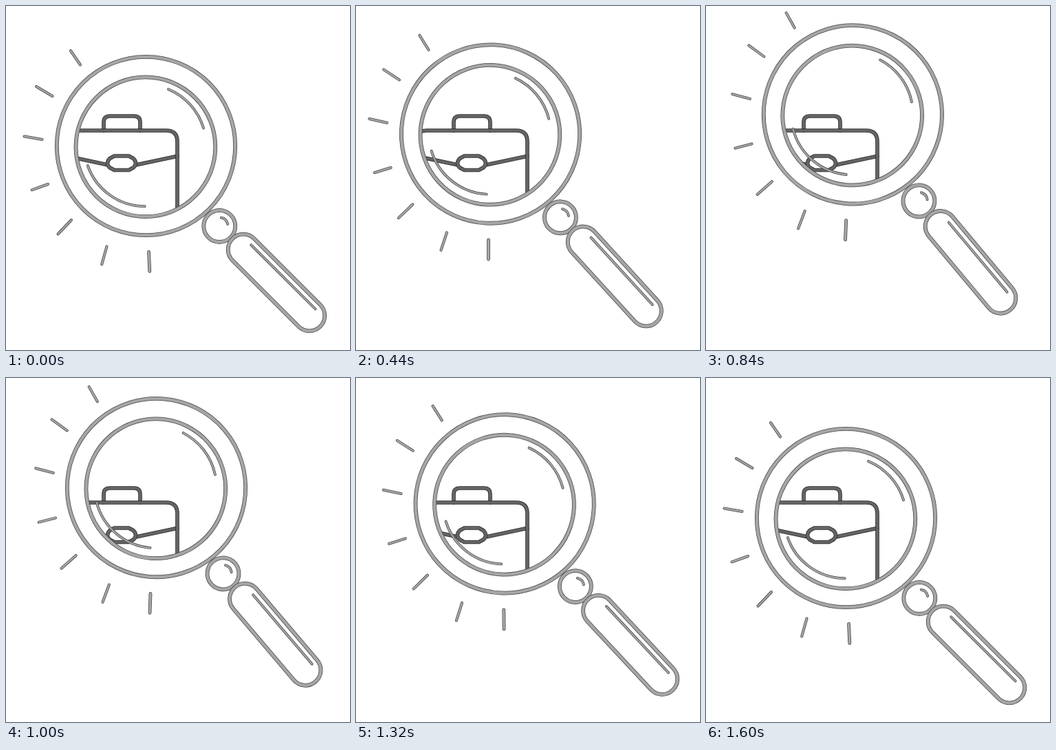
Write an HTML page that moves like this. It is 500x500 px and loops after 1640 ms.

```html
<!DOCTYPE html>
<html lang="en">
<head>
<meta charset="utf-8">
<title>Magnifier over briefcase</title>
<style>
html, body { margin: 0; width: 100%; height: 100%; overflow: hidden; background: #fff; }
svg { display: block; width: 100vw; height: 100vh; }
path { fill: none; stroke-linecap: round; stroke-linejoin: round; }
</style>
</head>
<body>
<svg viewBox="0 0 500 500">
  <clipPath id="view"><circle id="hole" r="101.5"/></clipPath>
  <g id="bag" clip-path="url(#view)"></g>
  <g id="glass"></g>
</svg>
<script>
const $ = id => document.getElementById(id);
const STEP = 40, STEPS = 41;
const HOLE = [-0.6, 1.3];

// A line drawn as a dark outline with a lighter core.
function line(parent, d, width, core, edge, rim = 1.5) {
  for (const [stroke, w] of [[edge, width], [core, width - rim]]) {
    const p = document.createElementNS("http://www.w3.org/2000/svg", "path");
    p.setAttribute("d", d);
    p.setAttribute("stroke", stroke);
    p.setAttribute("stroke-width", w);
    parent.append(p);
  }
}
const ring = (x, y, r) =>
  `M${x - r} ${y}a${r} ${r} 0 1 1 ${2 * r} 0a${r} ${r} 0 1 1 ${-2 * r} 0z`;

function drawBag() {
  const part = d => line($("bag"), d, 5.6, "#646464", "#262626");
  part("M142 181V169Q142 160 151 160H186Q195 160 195 169V181");
  part("M87 218L147 230.7M190 230.7L249 218.3");
  part("M87 330V197Q87 181 103 181H233Q249 181 249 197V330");
  part("M157.5 218H178.5L185 221.5Q188.5 225 188.5 228.5Q188.5 232 185 235L178.5 238.5H157.5L151 235Q147.5 232 147.5 228.5Q147.5 225 151 221.5Z");
}

// Coordinates are relative to the lens centre.
function drawGlass() {
  const part = (d, w = 5.8) => line($("glass"), d, w, "#a6a6a6", "#454545");
  const thin = d => part(d, 3.8);
  part(ring(0, 0, 129.7));
  part(ring(...HOLE, 101.4));
  part(ring(106.8, 116.5, 23));
  const r = 22.3, k = r * Math.SQRT1_2;
  part(`M${141.5 + k} ${150.5 - k}l96 96a${r} ${r} 0 0 1 ${-2 * k} ${2 * k}l-96 -96a${r} ${r} 0 0 1 ${2 * k} ${-2 * k}z`);
  thin("M32.5 -82.6A89 89 0 0 1 83.6 -26");
  thin("M-84.7 28.5A88.5 88.5 0 0 0 -1.8 87.7");
  thin("M109.3 104.2Q117 105.5 118.8 113.5");
  thin("M152.8 143.8L246.3 237");
  const rays = [
    [-109.5, -138.5, -95.5, -118], [-159.5, -86.5, -136, -72.5],
    [-177, -14, -151, -9.5], [-166, 63.8, -142.5, 55.5],
    [-128, 128, -108.5, 107.5], [-64.3, 172, -57, 146], [5.3, 182, 4, 154]
  ];
  rays.forEach(([a, b, c, d], i) => part(`M${a} ${b}L${c} ${d}`, i > 5 ? 4.8 : 4));
}

// Circular drift: lens x, lens y, tilt in degrees.
const wave = (mid, amp, phase, u) => mid + amp * Math.cos(2 * Math.PI * (u + phase / 360));
const drift = u => [
  wave(207.5, 12.3, 109, u),
  wave(181, 23.5, -21, u),
  wave(2.6, 2.45, 172, u)
];
// Poses that the drift is nudged through: phase, x, y, tilt.
const keys = [
  [0, 203.5, 203.5, 0], [0.15, 195.2, 200.6, 0.97], [0.375, 200.6, 171.8, 3.95],
  [0.525, 213.4, 157.8, 5.1], [0.725, 219.4, 169.5, 3.45], [0.9, 211.5, 192.6, 1.08],
  [1, 203.5, 203.5, 0]
];
function pose(u) {
  const i = Math.max(1, keys.findIndex(k => u <= k[0]));
  const [a, b] = [keys[i - 1], keys[i]];
  const f = (u - a[0]) / (b[0] - a[0]);
  const da = drift(a[0]), db = drift(b[0]);
  return drift(u).map((v, j) =>
    v + (a[j + 1] - da[j]) * (1 - f) + (b[j + 1] - db[j]) * f);
}

function render(ms) {
  const n = Math.floor(ms / STEP) % STEPS;
  const [x, y, tilt] = pose(n / (STEPS - 1));
  const move = `translate(${x} ${y}) rotate(${tilt})`;
  $("glass").setAttribute("transform", move);
  $("hole").setAttribute("transform", move);
}

function tick() {
  render(performance.now());
  requestAnimationFrame(tick);
}

$("hole").setAttribute("cx", HOLE[0]);
$("hole").setAttribute("cy", HOLE[1]);
drawBag();
drawGlass();
tick();
</script>
</body>
</html>
```
